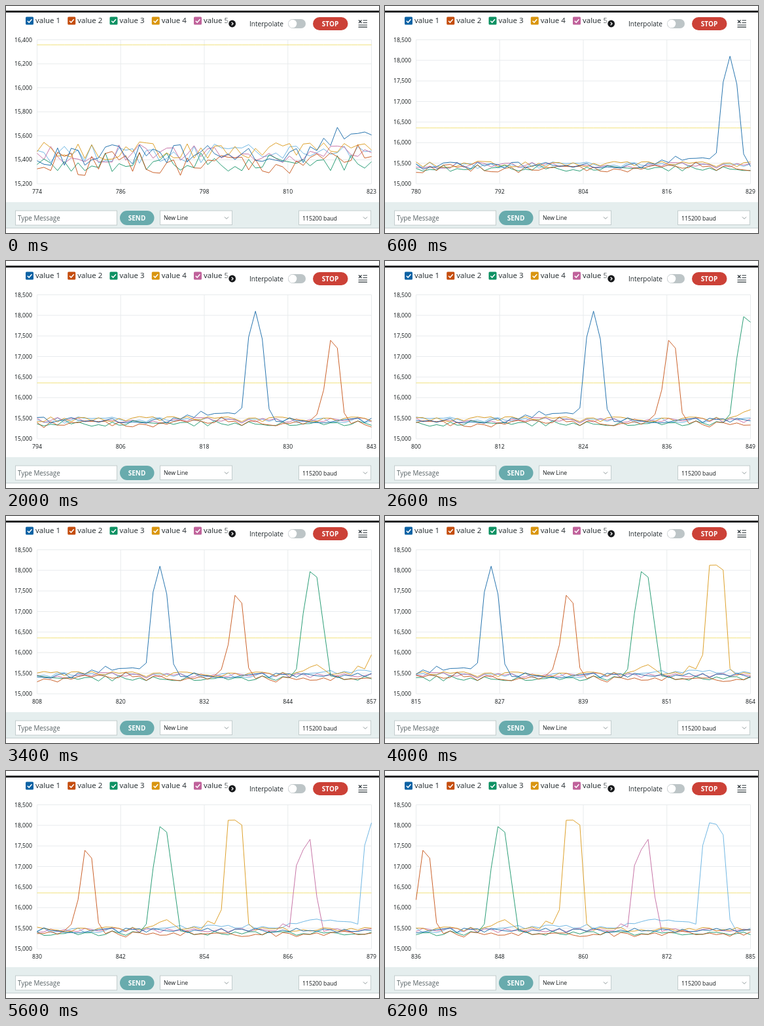
Write an HTML page that moves like this. It is 570 px wide and 346 px high and loops after 6400 ms.

```html
<!DOCTYPE html>
<html lang="en">
<head>
<meta charset="utf-8">
<title>Serial plotter</title>
<style>
  html, body { margin: 0; width: 100%; height: 100%; overflow: hidden; background: #fff; }
  svg { display: block; width: 570px; height: 346px; font-family: "Open Sans", "Noto Sans", sans-serif; fill: #20282c; }
  .tick { font-size: 8.7px; fill: #14191b; }
  .grid { stroke: #e8ebed; stroke-width: 1; }
  .line { fill: none; stroke-width: .88; stroke-linejoin: round; }
  .button { font-size: 10px; font-weight: 700; fill: #fff; text-anchor: middle; }
  .field { fill: #fff; stroke: #c3cdce; }
  .chevron { fill: none; stroke: #8b9698; }
</style>
</head>
<body>
<svg id="stage" viewBox="0 0 570 346">
  <defs>
    <linearGradient id="fade">
      <stop offset="0" stop-color="#fff" stop-opacity="0"/>
      <stop offset="1" stop-color="#fff"/>
    </linearGradient>
  </defs>
  <rect width="570" height="346" fill="#fff"/>
  <rect y="7" width="570" height="3" fill="#1f2124"/>
  <g id="legend" font-size="11.5"></g>
  <rect x="333" y="14" width="11" height="18" fill="url(#fade)"/>
  <circle cx="345.7" cy="27" r="5.4" fill="#17191b"/>
  <path d="M344.7 24.7l2.4 2.3-2.4 2.3" fill="none" stroke="#fff" stroke-width="1.2"/>

  <text x="372" y="30.7" font-size="10.1">Interpolate</text>
  <rect x="431" y="20" width="27" height="14" rx="7" fill="#bdc5c7"/>
  <circle cx="438" cy="27" r="6.3" fill="#fff"/>
  <rect x="469" y="17" width="53.5" height="20" rx="10" fill="#cc4137"/>
  <text class="button" x="495.5" y="30.8">STOP</text>
  <path d="M539 21.5l4.5 4.5m0-4.5l-4.5 4.5M545.5 22h6.5M545.5 25.5h6.5M538.5 29h13.5M538.5 32.2h13.5"
    fill="none" stroke="#2b3439" stroke-width="1.2"/>

  <g id="axes"></g>
  <g id="lines"></g>

  <rect y="299" width="570" height="39" fill="#e5eeee"/>
  <rect y="338" width="570" height="1" fill="#c5cfd0"/>
  <rect class="field" x="14.5" y="312" width="155" height="22"/>
  <text x="18" y="326.6" font-size="9.9" style="fill:#566164">Type Message</text>
  <rect x="174" y="312" width="52.5" height="22" rx="11" fill="#68abad"/>
  <text class="button" x="200" y="326.6">SEND</text>
  <rect class="field" x="235.5" y="312" width="110" height="21.5"/>
  <text class="tick" x="241" y="326">New Line</text>
  <path class="chevron" d="M334 321.5l3 3 3-3"/>
  <rect class="field" x="447.5" y="312" width="110" height="21.5"/>
  <text class="tick" x="453" y="326.5">115200 baud</text>
  <path class="chevron" d="M546 321.5l3 3 3-3"/>
</svg>
<script>
const FIRST = 774, COUNT = 50, STEPS = 32, STEP_MS = 200, TOTAL = 114;
const LEFT = 47.5, RIGHT = 558.5, TOP = 51.5, BOTTOM = 271;

// Seeded noise around a base, plus one tall pulse and some low swells.
const series = [
  { color: "#0b62a4", base: 15440, noise: 95, pulses: [
    { at: 826, height: 2665, width: 1.5, power: 2.9 },
    { at: 820.2, height: 190, width: 4.2, power: 5 }] },
  { color: "#c44d0e", base: 15365, noise: 110, pulses: [
    { at: 837.35, height: 2060, width: 1.36, power: 3.5 },
    { at: 835, height: 230, width: 0.8, power: 4 },
    { at: 819, height: 90, width: 5, power: 4 }] },
  { color: "#0e9163", base: 15380, noise: 85, pulses: [
    { at: 848.4, height: 2560, width: 1.73, power: 3.5 },
    { at: 846, height: 110, width: 0.8, power: 4 }] },
  { color: "#d9950f", base: 15475, noise: 80, pulses: [
    { at: 858.9, height: 2680, width: 1.75, power: 6 },
    { at: 848.6, height: 180, width: 2.2, power: 4 },
    { at: 855.4, height: 190, width: 1, power: 4 }] },
  { color: "#c0629b", base: 15450, noise: 85, pulses: [
    { at: 869.25, height: 2020, width: 1.73, power: 7.5, tilt: 0.1 },
    { at: 866.5, height: 110, width: 1, power: 4 }] },
  { color: "#5eade0", base: 15460, noise: 95, pulses: [
    { at: 879.63, height: 2520, width: 2.07, power: 6 },
    { at: 872, height: 130, width: 5.5, power: 6 },
    { at: 864, height: 85, width: 15, power: 6 }] },
  { color: "#f0df68", base: 16358, noise: 0, pulses: [] }
];

function random(seed) {
  return () => {
    seed = (seed * 1664525 + 1013904223) >>> 0;
    return seed / 4294967296;
  };
}

function bump(n, { at, height, width, power, tilt = 0 }) {
  const d = n - at;
  return height * (1 + tilt * d) * Math.exp(-(Math.abs(d / width) ** power));
}

function samples({ base, noise, pulses }, index) {
  const next = random(index * 7919 + 31);
  return Array.from({ length: TOTAL }, (_, i) => {
    const jitter = (2 * next() - 1) * noise * (1 - 0.45 * i / TOTAL);
    return pulses.reduce((sum, p) => sum + bump(FIRST + i, p), base + jitter);
  });
}

const $ = id => document.getElementById(id);

$("legend").innerHTML = series.slice(0, 5).map(({ color }, i) => {
  const x = 30 + i * 64.25;
  return `<rect x="${x}" y="16.5" width="12" height="12" rx="1.5" fill="${color}"/>
    <path d="M${x + 2.8} 22.7l2.4 2.4 4.3-4.8" fill="none" stroke="#fff" stroke-width="1.5"/>
    <text x="${x + 15}" y="26.2">value ${i + 1}</text>`;
}).join("");

const data = series.map(samples);
const paths = series.map(({ color }) => {
  const path = document.createElementNS("http://www.w3.org/2000/svg", "path");
  path.setAttribute("class", "line");
  path.setAttribute("stroke", color);
  $("lines").prepend(path);
  return path;
});

function scaleFor(values) {
  const low = Math.min(...values), high = Math.max(...values);
  const rough = (high - low) / 10;
  const power = 10 ** Math.floor(Math.log10(rough));
  const step = [1, 2, 5, 10].find(m => m * power >= rough) * power;
  return { step, min: Math.floor(low / step) * step, max: Math.ceil(high / step) * step };
}

function draw(k) {
  // Two samples arrive per step; around the middle one comes early.
  const offset = 2 * k + (k > 18 && k < 23 ? 1 : 0);
  const shown = data.map(d => d.slice(offset, offset + COUNT));
  const { step, min, max } = scaleFor(shown.flat());
  const yOf = v => BOTTOM - (v - min) / (max - min) * (BOTTOM - TOP);
  const xOf = i => LEFT + i / (COUNT - 1) * (RIGHT - LEFT);

  let axes = "";
  for (let v = min; v <= max; v += step) {
    const y = yOf(v);
    axes += `<path class="grid" d="M${LEFT} ${y}H${RIGHT}"/>
      <text class="tick" x="40" y="${y + 3}" text-anchor="end">${v.toLocaleString("en-US")}</text>`;
  }
  for (let i = 0; i <= 4; i++) {
    const pos = i * (COUNT - 1) / 4, x = xOf(pos);
    axes += `<path class="grid" d="M${x} ${TOP}V${BOTTOM}"/>
      <text class="tick" x="${x}" y="286.2" text-anchor="middle">${Math.floor(FIRST + offset + pos)}</text>`;
  }
  $("axes").innerHTML = axes;

  shown.forEach((values, s) => {
    const points = values.map((v, i) => `${xOf(i).toFixed(2)} ${yOf(v).toFixed(2)}`);
    paths[s].setAttribute("d", "M" + points.join("L"));
  });
}

let last = -1;
const begin = performance.now();
function tick() {
  const k = Math.floor((performance.now() - begin) / STEP_MS) % STEPS;
  if (k !== last) draw(last = k);
  requestAnimationFrame(tick);
}
tick();
</script>
</body>
</html>
```
